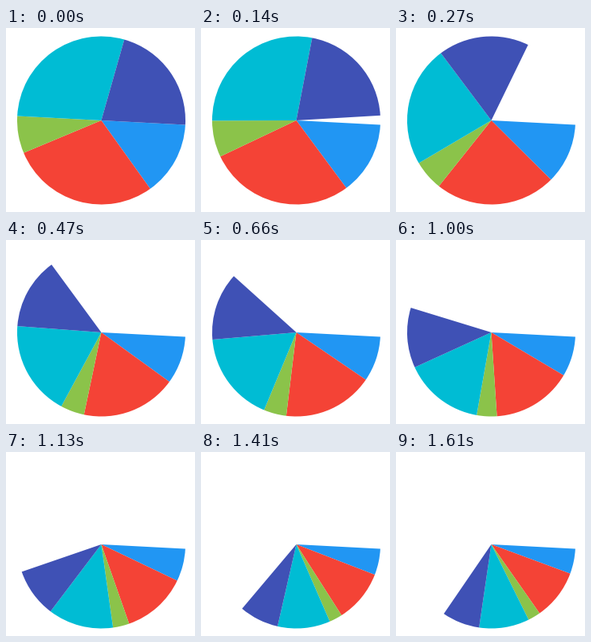
A matplotlib script for the animation above (2810 ms loop, 237x231 px).

```python
import numpy as np
import matplotlib.pyplot as plt
from matplotlib.animation import FuncAnimation
from matplotlib.patches import Wedge

WIDTH, HEIGHT, DPI = 237, 231, 64
LOOP_MS, TICK_MS = 2810, 10
STEP_MS, LAST_STEP = 66.6, 24

CENTER, RADIUS = (119.5, 116), 105.5
START_ANGLE = 3
SLICES = [(10, "#2196F3"), (20, "#F44336"), (5, "#8BC34A"),
          (20, "#00BCD4"), (15, "#3F51B5")]
BOUNDS = np.cumsum([0] + [value for value, _ in SLICES])
BOUNDS = BOUNDS / BOUNDS[-1]

# Cubic bezier (0.4, 0, 0.2, 1): fast out, slow in
S = np.linspace(0, 1, 400)
EASE_X = 1.2 * S * (1 - S) ** 2 + 0.6 * S ** 2 * (1 - S) + S ** 3
EASE_Y = 3 * S ** 2 * (1 - S) + S ** 3


def ease(step, start, duration):
    return np.interp((step - start) / duration, EASE_X, EASE_Y)


def sweep_at(step):
    """Total angle of the pie: full circle, then two eased collapses."""
    return 360 - 141 * ease(step, 0.8, 9.4) - 98 * ease(step, 11.5, 13.6)


fig = plt.figure(figsize=(WIDTH / DPI, HEIGHT / DPI), dpi=DPI, facecolor="white")
ax = fig.add_axes([0, 0, 1, 1])
ax.set_xlim(0, WIDTH)
ax.set_ylim(HEIGHT, 0)
ax.axis("off")

wedges = [ax.add_patch(Wedge(CENTER, RADIUS, 0, 1, facecolor=color, linewidth=0))
          for _, color in SLICES]


def update(tick):
    step = min(LAST_STEP, int((tick * TICK_MS + 6) / STEP_MS))
    angles = START_ANGLE + sweep_at(step) * BOUNDS
    for wedge, begin, end in zip(wedges, angles, angles[1:]):
        wedge.set_theta1(begin)
        wedge.set_theta2(end)
    return wedges


anim = FuncAnimation(fig, update, frames=LOOP_MS // TICK_MS,
                     interval=TICK_MS, repeat=True, repeat_delay=0)
plt.show()
```
